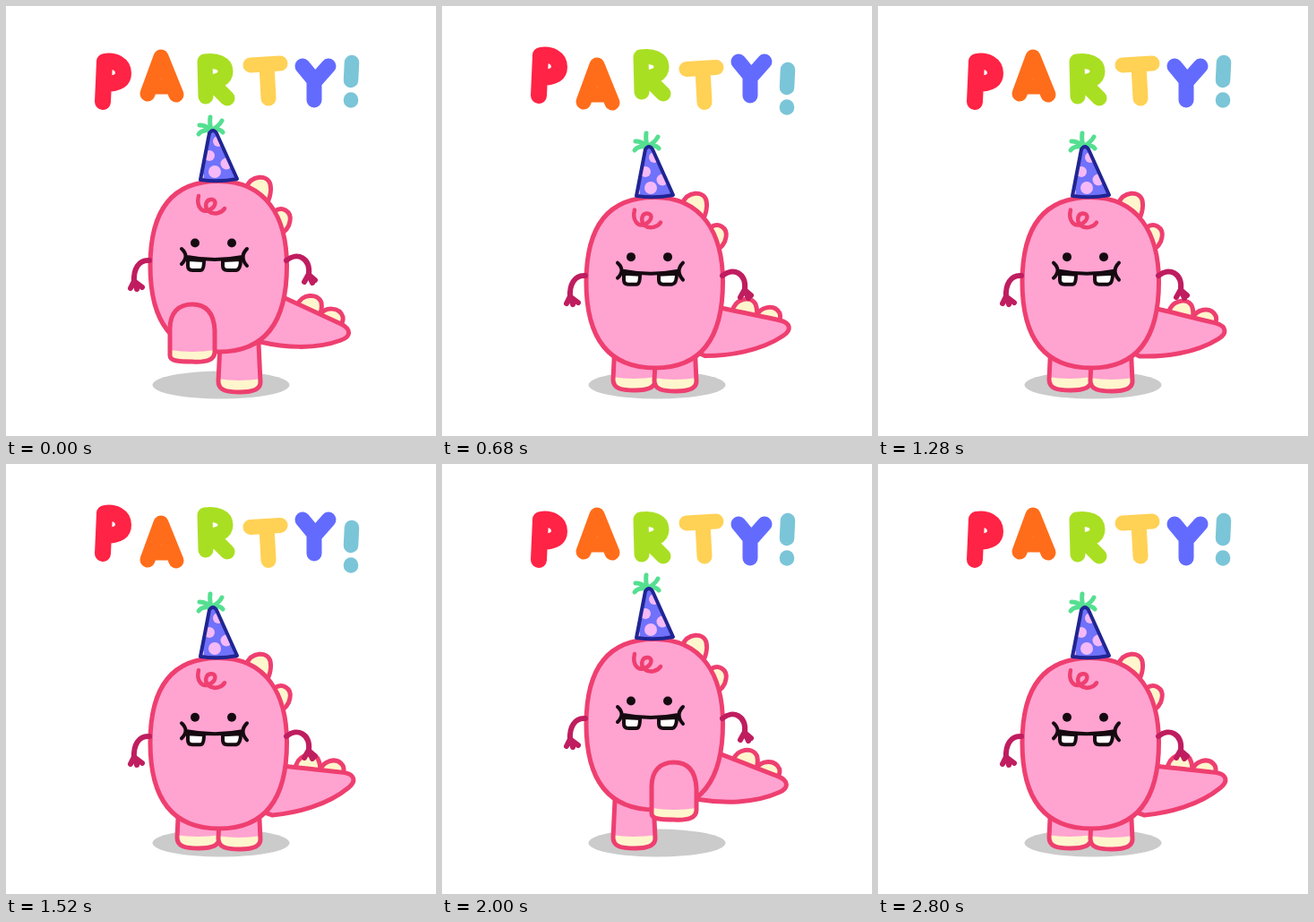
An HTML page with a canvas for the animation above (2.88 s loop, 480 px wide and 480 px high).

```html
<!DOCTYPE html>
<html>
<head>
<meta charset="utf-8">
<style>
html, body { margin: 0; width: 100%; height: 100%; overflow: hidden; background: #fff; }
canvas { display: block; }
</style>
</head>
<body>
<canvas id="stage" width="480" height="480"></canvas>
<script>
const ctx = document.getElementById('stage').getContext('2d');
const LOOP = 2880, TICK = 40, HOP = 288, SWING = LOOP / 7;
const PINK = '#ffa3d1', ROSE = '#ee3f70', CREAM = '#fff6cd', WINE = '#bf1d5f', INK = '#150a10';

// Each curve is a list of [time, value] points.
const BODY_DROP = [[0, 0], [40, 0], [80, 21], [96, 18], [136, 18], [208, 21], [248, 21], [272, 0], [288, 0]];
const TAIL_TURN = [[0, 0], [40, 0], [80, -.325], [96, -.26], [112, -.195], [136, -.195],
  [208, -.325], [248, -.325], [272, -.065], [288, 0]];
const LEG_LIFT = [[0, 1], [40, 1], [80, 0], [248, 0], [272, 1], [288, 1]];
const LETTER_MIX = [[0, 0], [.2, 0], [.43, .6], [.55, 1], [.69, 1], [.81, 0], [1, 0]];

const LETTERS = [
  { color: '#ff2345', shift: -7, width: 18, d: 'M108 107L110 62C121 60 131 65 131 75C131 85 120 87 109 87' },
  { color: '#ff6d1a', shift: 9, width: 17, d: 'M158 98L173 57L190 99M164 90H184' },
  { color: '#a9df22', shift: -5, width: 17, d: 'M222 62L223 101M222 62C235 60 245 64 245 73C245 82 235 85 224 85M229 85L247 103' },
  { color: '#ffd155', shift: 4.5, width: 17, d: 'M273 66L306 64M291 66L293 103' },
  { color: '#636bff', shift: -5, width: 17, d: 'M331 67L345 84L360 67M344 84V105' },
  { color: '#7bc5d8', shift: 8, width: 16.5, d: 'M386 63L385 83M385 104.5V105.5' }
];

function sample(curve, x) {
  const i = Math.max(1, curve.findIndex(p => p[0] >= x));
  const [x0, y0] = curve[i - 1], [x1, y1] = curve[i];
  const k = (x - x0) / (x1 - x0);
  return y0 + (y1 - y0) * k * k * (3 - 2 * k);
}

function shape(d, fill, stroke, width = 5) {
  const path = new Path2D(d);
  if (fill) { ctx.fillStyle = fill; ctx.fill(path); }
  if (stroke) { ctx.strokeStyle = stroke; ctx.lineWidth = width; ctx.stroke(path); }
}

function dot(x, y, rx, ry, color) {
  ctx.fillStyle = color;
  ctx.beginPath();
  ctx.ellipse(x, y, rx, ry, 0, 0, Math.PI * 2);
  ctx.fill();
}

function moved(x, y, draw) {
  ctx.save();
  ctx.translate(x, y);
  draw();
  ctx.restore();
}

function clipped(d, draw) {
  ctx.save();
  ctx.clip(new Path2D(d));
  draw();
  ctx.restore();
}

function leg(d, soleY) {
  shape(d, PINK);
  clipped(d, () => shape(`M-40 ${soleY - 4}Q0 ${soleY + 6} 40 ${soleY - 4}V450H-40Z`, CREAM));
  shape(d, null, ROSE);
}

function standingLeg(x) {
  moved(x, 0, () => leg('M-21 375L-23 417C-23 427 -14 429 1 429C16 429 24 426 24 418L22 375', 415));
}

function raisedLeg(x, drop) {
  moved(x, drop, () => leg('M-25 390V360C-25 342 -15 333 0 333C16 333 24 343 25 362V386C25 395 16 398 0 397C-17 397 -25 396 -25 390Z', 385));
}

function tail(drop, turn) {
  ctx.save();
  ctx.translate(290 - turn * 16, 350 + drop + turn * 14);
  ctx.rotate(turn);
  ctx.translate(-290, -350);
  shape('M325 334C330 321 348 320 352 331C353 337 352 341 350 345Z', CREAM, ROSE);
  shape('M350 345C356 336 372 335 376 347C377 351 375 354 373 358Z', CREAM, ROSE);
  shape('M298 320C325 332 352 345 374 355C386 361 385 369 374 373C345 384 310 381 284 375L265 360Z', PINK, ROSE);
  ctx.restore();
}

function hat() {
  shape('M229 138Q227 130 228 124M230 138Q238 134 241 128M229 138Q222 133 216 133M228 139Q219 138 215 143M231 138Q239 137 242 141',
    null, '#55df91', 5);
  const cone = 'M227 142Q231 136 235 142L258 193Q238 197 217 194Z';
  shape(cone, '#7072fb');
  clipped(cone, () => {
    for (const [x, y, r] of [[237, 151, 6], [227, 167, 6], [246, 176, 6.5], [233, 185, 7], [217, 190, 4]])
      dot(x, y, r, r, '#f4b9f6');
  });
  shape(cone, null, '#202593', 4);
}

function face() {
  shape('M215 212C212 224 219 231 226 228C234 225 236 217 230 216C223 215 221 224 226 229C232 234 241 231 244 226',
    null, ROSE, 4.5);
  dot(211, 264.5, 5, 5, INK);
  dot(252, 264.5, 5, 5, INK);
  shape('M203 283V290Q203 295 208 295H217Q221 295 221 284Z', '#fff', INK, 4);
  shape('M242 284V290Q242 295 247 295H257Q262 294 262 283Z', '#fff', INK, 4);
  shape('M202 280Q233 286 264 280M196 271Q205 279 196 288M269 271Q260 280 269 290', null, INK, 4);
}

function arms() {
  shape('M160 284C148 283 142 294 143 308', null, WINE, 6);
  shape('M143 307L139 315M144 308L146 316M144 308L152 314', null, WINE, 6);
  shape('M313 284C325 274 340 281 338 300', null, WINE, 6);
  shape('M338 299L333 308M338 300L342 309M338 300L345 306', null, WINE, 6);
}

function draw(time) {
  const hopTime = time % HOP;
  const drop = sample(BODY_DROP, hopTime);
  const lift = sample(LEG_LIFT, hopTime);
  const leftTurn = Math.round(time / HOP) % 2 === 0;
  const raised = lift > .35;
  const mix = sample(LETTER_MIX, time % SWING / SWING);

  ctx.fillStyle = '#fff';
  ctx.fillRect(0, 0, 480, 480);
  ctx.lineCap = ctx.lineJoin = 'round';

  for (const { d, color, shift, width } of LETTERS)
    moved(0, shift * mix, () => shape(d, null, color, width));

  dot(240, 423, 76.5, 15.5, '#cbcbcb');
  tail(drop, sample(TAIL_TURN, hopTime));
  if (!(raised && leftTurn)) standingLeg(214);
  if (!(raised && !leftTurn)) moved(0, raised ? 2 : 1, () => standingLeg(260));

  moved(0, drop, () => {
    shape('M268 203C274 188 292 188 295 199C297 208 293 218 290 223Z', CREAM, ROSE);
    shape('M300 229C308 223 319 229 317 240C316 248 309 254 303 257Z', CREAM, ROSE);
    shape('M237 195.5C180 195.5 161 235 161 290C161 352 185 386 238 386C290 386 313.5 352 313.5 290C313.5 235 290 195.5 237 195.5Z', PINK, ROSE);
    hat();
  });
  moved(0, drop * .87, face);
  moved(0, drop * .95, arms);
  if (raised) raisedLeg(leftTurn ? 208 : 259, (1 - lift) * 32);
}

function tick() {
  const time = performance.now() % LOOP;
  draw(Math.floor(time / TICK) * TICK);
  requestAnimationFrame(tick);
}
tick();
</script>
</body>
</html>
```
